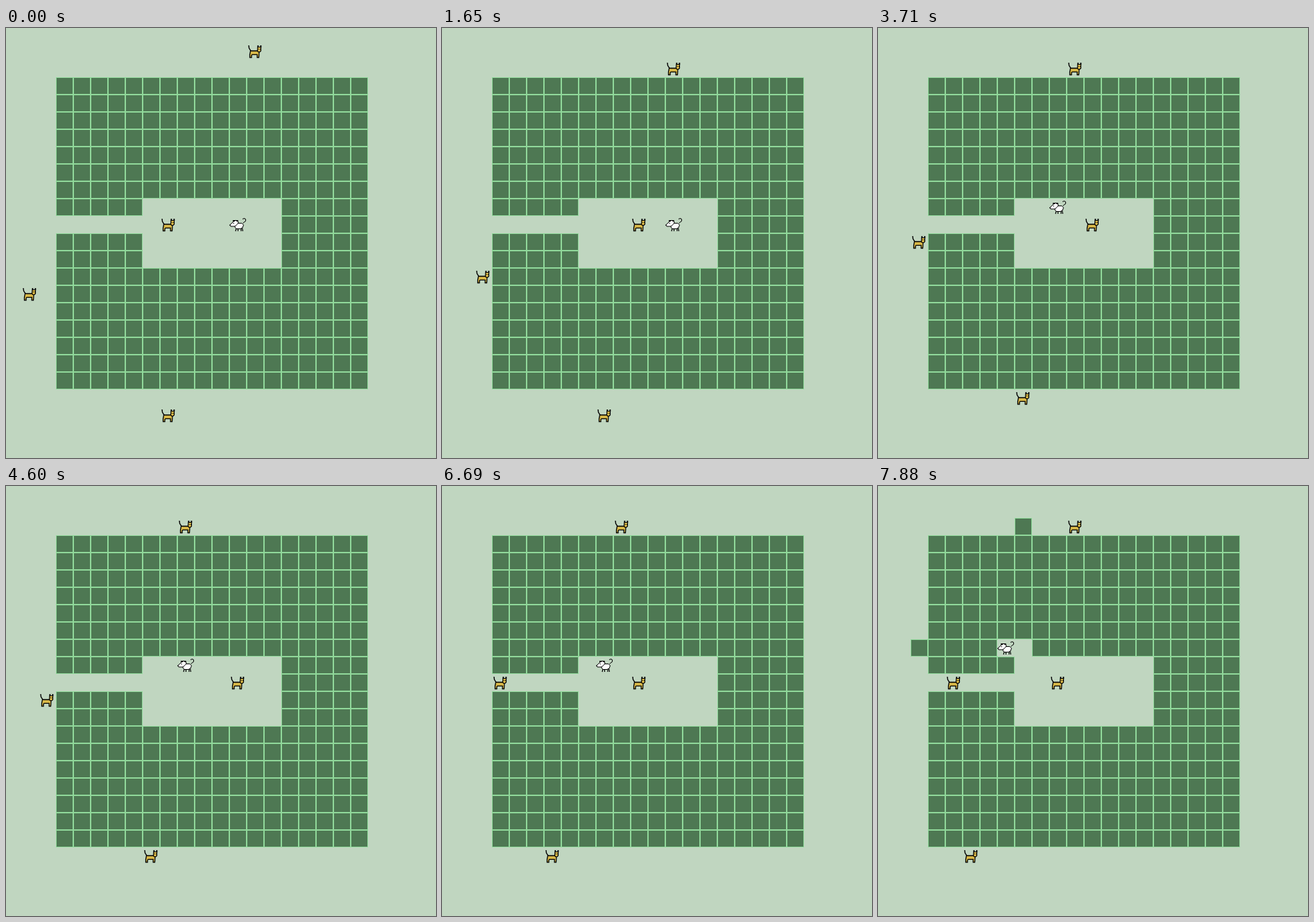
An HTML page with a canvas that plays this animation: 620 by 620 pixels, repeating every 8 s.

```html
<!DOCTYPE html>
<html lang="en">
<head>
<meta charset="utf-8">
<style>
html, body { margin: 0; width: 100%; height: 100%; overflow: hidden; background: #c0d6c0; }
canvas { display: block; }
</style>
</head>
<body>
<canvas id="stage" width="620" height="620"></canvas>
<script>
const ctx = document.getElementById('stage').getContext('2d');
const LOOP = 8000, CELL = 25;
const STEP = { L: [-1, 0], R: [1, 0], U: [0, -1], D: [0, 1] };
const PUSH_UP = 7440, PUSH_LEFT = 7880;

// Each actor starts on a cell and takes one step at each listed time.
const cats = [
  { at: [14, 1], moves: 'LDLLLLRR', times: [300, 1350, 2540, 3570, 4600, 5650, 6690, 7880] },
  { at: [9, 11], moves: 'RRRRLLL', times: [600, 1650, 2830, 3860, 4900, 6090, 6990] },
  { at: [1, 15], moves: 'URUUURR', times: [300, 1500, 2540, 3570, 4750, 5790, 6840] },
  { at: [9, 22], moves: 'DUULLLL', times: [300, 1500, 2690, 3710, 4750, 5940, 6990] }
];
const mouse = {
  at: [13, 11], moves: 'ULLLLDURLLUL',
  times: [2690, 3280, 3430, 3570, 5350, 5650, 5940, 6840, 7140, 7290, PUSH_UP, PUSH_LEFT]
};

const shape = d => new Path2D(d);
const catTail = shape('M1 1 L1.5 5 L3 7.5 L4 9');
const catBody = shape('M3.5 9 H14 L16 11 L15.5 18.5 H13.2 V14.3 H6 L5 15.5 V18.5 H2.5 V14 L3 12Z');
const catHead = shape('M14 3.5 H18.5 V9 L17 10.5 H14.5 L13.5 8.5Z');
const catMarks = shape('M13.5 1 h1.8 v3 h-1.8z M17.5 1 h1.8 v3 h-1.8z M15 6 h1 v1 h-1z M17 6 h1 v1 h-1z');
const mouseTail = shape('M19 4.5 Q21 3 23 4 Q24.5 6 23 8 Q21 9 19.5 10.5');
const mouseBody = shape('M8 11 L12 10.5 H18 L20.5 13 L19 17 L16 18.5 H10 L8 16Z');
const mouseHead = shape('M.8 13 L5 9 L8 6.5 H12 L13 10 L11.5 12 L8 15 H2Z');
const mouseLegs = shape('M10 18 L9 22 M12.5 18 V22 M17 18 V22 M18.5 17 L19.5 22');
const mouseMarks = shape('M5 6 h3 v2 h-3z M10 6 h2.5 v1.8 h-2.5z M5.5 10 h1.2 v1.2 h-1.2z M.3 12.5 h1.2 v1.2 h-1.2z');

function paint(path, fill, width) {
  ctx.lineWidth = width;
  if (fill) { ctx.fillStyle = fill; ctx.fill(path); }
  ctx.strokeStyle = '#000';
  ctx.stroke(path);
}

function solid(path) {
  ctx.fillStyle = '#000';
  ctx.fill(path);
}

function drawCat() {
  ctx.translate(2, 3);
  paint(catTail, null, 1.4);
  paint(catBody, '#d9b948', 1.3);
  paint(catHead, '#d9b948', 1.2);
  solid(catMarks);
}

function drawMouse() {
  paint(mouseTail, null, 1);
  paint(mouseLegs, null, 1.2);
  paint(mouseBody, '#fff', 1);
  paint(mouseHead, '#fff', 1);
  solid(mouseMarks);
}

function drawTile() {
  ctx.fillStyle = '#90d89a';
  ctx.fillRect(0, 0, CELL, CELL);
  ctx.fillStyle = '#4e7853';
  ctx.fillRect(1, 1, CELL - 2, CELL - 2);
}

function atCell(col, row, draw) {
  ctx.save();
  ctx.translate(col * CELL - 3, row * CELL - 4);
  draw();
  ctx.restore();
}

function drawActor({ at: [col, row], moves, times }, t, draw) {
  times.forEach((time, i) => {
    if (t < time) return;
    col += STEP[moves[i]][0];
    row += STEP[moves[i]][1];
  });
  atCell(col, row, draw);
}

function drawWalls(t) {
  for (let row = 3; row <= 20; row++) {
    for (let col = 3; col <= 20; col++) {
      const room = col >= 8 && col <= 15 && row >= 10 && row <= 13;
      const passage = row === 11 && col < 8;
      if (room || passage) continue;
      const up = t >= PUSH_UP && col === 8 && row < 10;
      const left = t >= PUSH_LEFT && row === 9 && col < 8;
      atCell(col - left, row - up, drawTile);
    }
  }
}

function frame(now) {
  const t = now % LOOP;
  ctx.fillStyle = '#c0d6c0';
  ctx.fillRect(0, 0, 620, 620);
  drawWalls(t);
  cats.forEach(cat => drawActor(cat, t, drawCat));
  drawActor(mouse, t, drawMouse);
  requestAnimationFrame(() => frame(performance.now() - start));
}

const start = performance.now();
frame(0);
</script>
</body>
</html>
```
